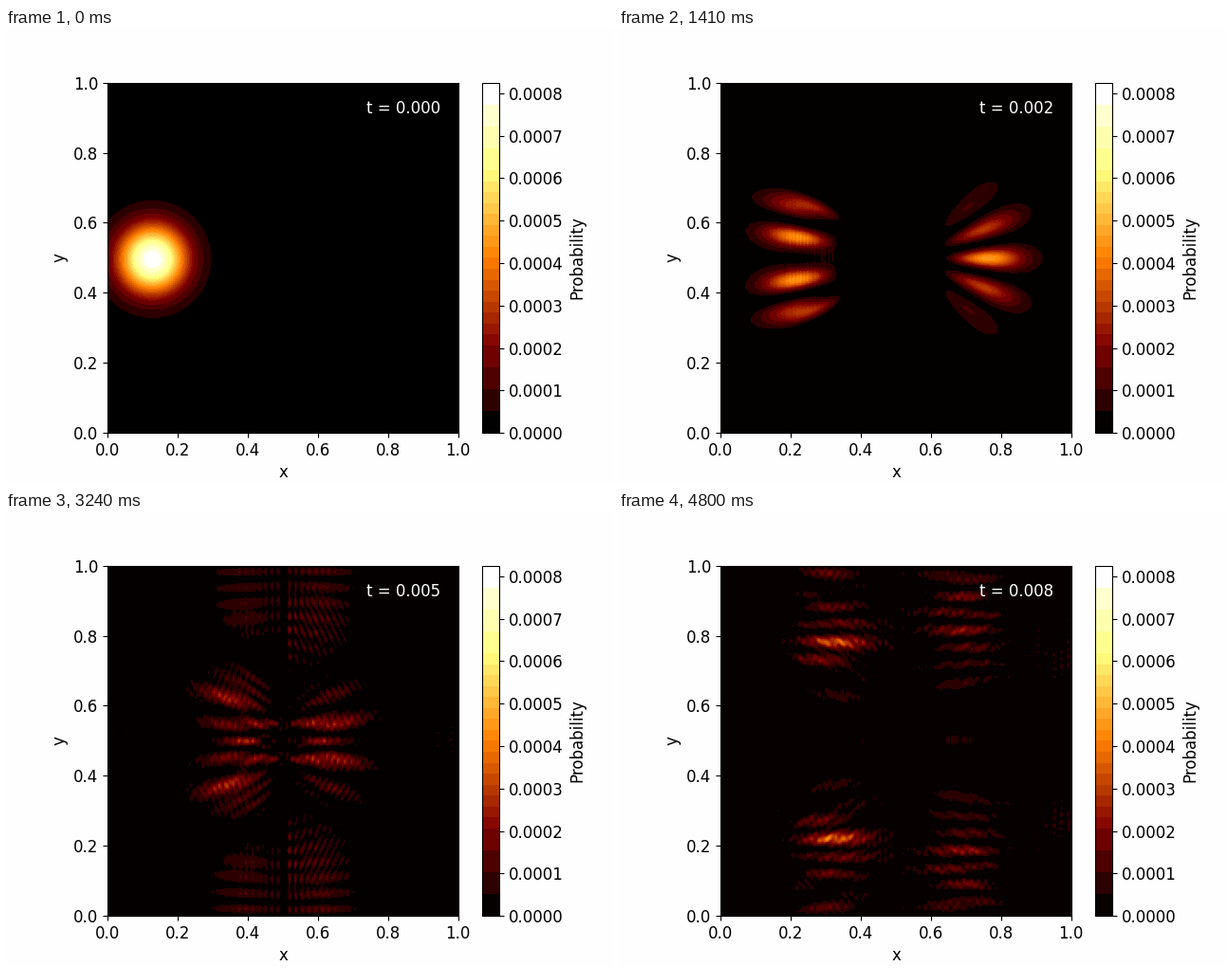
Animation of 640x480 px, one loop 4.83 s. Source, as a matplotlib script:

```python
import numpy as np
import matplotlib.pyplot as plt
from matplotlib.animation import FuncAnimation
from matplotlib.colors import ListedColormap

# Wave packet hitting a double slit: Crank-Nicolson on a closed unit box.
H = 0.005
DT = 2.5e-5
N = 199
FRAMES = 161
STEPS_PER_FRAME = 2
WALL = slice(98, 102)
SLITS = np.r_[85:95, 105:115]
A = 0.5j * DT / H**2


def sine_basis(n):
    k = np.arange(1, n + 1)
    return np.sqrt(2 / (n + 1)) * np.sin(np.pi * np.outer(k, k) / (n + 1))


def sine_energy(n):
    return 2 - 2 * np.cos(np.pi * np.arange(1, n + 1) / (n + 1))


def laplace(n):
    return 2 * np.eye(n) - np.eye(n, k=1) - np.eye(n, k=-1)


QY = sine_basis(N)
QS = QY[SLITS]


class Side:
    """Open area beside the wall, held as sine coefficients."""

    def __init__(self, cols, edge, slit_col, psi):
        n = cols.stop - cols.start
        self.cols, self.slit_col = cols, slit_col
        self.qx = sine_basis(n)
        self.edge = self.qx[edge]
        self.op = 1 + A * (sine_energy(N)[:, None] + sine_energy(n))
        self.coef = QY @ psi[:, cols] @ self.qx

    def edge_green(self):
        return (QS * (self.edge**2 / self.op).sum(axis=1)) @ QS.T

    def solve_free(self):
        self.free = self.coef / self.op
        return QS @ (self.free @ self.edge)

    def advance(self, slit):
        source = np.outer(QS.T @ slit[:, self.slit_col], self.edge)
        self.coef = 2 * (self.free + A * source / self.op) - self.coef

    def field(self):
        return QY @ self.coef @ self.qx


def start_wave():
    x = np.arange(N) * H
    packet = np.exp(-(x - 0.125)**2 / 0.02 + 200j * x)
    psi = np.outer(np.exp(-(x - 0.5)**2 / 0.02), packet)
    closed = np.ones(N, bool)
    closed[SLITS] = False
    psi[closed, WALL] = 0
    return psi / np.sqrt((abs(psi)**2).sum())


def simulate():
    psi = start_wave()
    depth = WALL.stop - WALL.start
    height = len(SLITS) // 2
    sides = [Side(slice(0, WALL.start), -1, 0, psi),
             Side(slice(WALL.stop, N), 0, depth - 1, psi)]
    slit = psi[SLITS, WALL]

    one_slit = (np.kron(laplace(height), np.eye(depth))
                + np.kron(np.eye(height), laplace(depth)))
    schur = np.eye(slit.size) + A * np.kron(np.eye(2), one_slit)
    for side in sides:
        at = np.arange(len(SLITS)) * depth + side.slit_col
        schur[np.ix_(at, at)] -= A**2 * side.edge_green()
    inverse = np.linalg.inv(schur)

    result = []
    for _ in range(FRAMES):
        prob = np.zeros((N, N))
        prob[SLITS, WALL] = abs(slit)**2
        for side in sides:
            prob[:, side.cols] = abs(side.field())**2
        result.append(prob)
        for _ in range(STEPS_PER_FRAME):
            rhs = slit.copy()
            for side in sides:
                rhs[:, side.slit_col] += A * side.solve_free()
            solved = (inverse @ rhs.ravel()).reshape(slit.shape)
            for side in sides:
                side.advance(solved)
            slit = 2 * solved - slit
    return result


probs = simulate()
vmax = probs[0].max()

# Banded colours: each coarse RGB cell shows the mean of what falls in it.
heat = (plt.get_cmap("afmhot")(np.arange(256))[:, :3] * 255).astype(int)
cells = heat // [32, 16, 32]
band = np.unique(cells @ [256, 16, 1], return_inverse=True)[1].ravel()
CELL_AREA = (369.6 / N)**2
BAR_AREA = 18.48 * 369.6 / 256
PAGE_AREA = 160000


def banded_cmap(prob):
    index = np.clip(prob / vmax * 256, 0, 255).astype(int)
    weight = np.bincount(index.ravel(), minlength=256) * CELL_AREA + BAR_AREA
    weight[255] += PAGE_AREA
    total = np.bincount(band, weight)
    means = [np.bincount(band, weight * heat[:, c]) / total for c in range(3)]
    colors = np.floor(np.stack(means, axis=1) + 1e-9)[band]
    return ListedColormap(np.minimum((colors + 0.5) / 255, 1))


PAPER = "#fefefe"
FONT = 12
plt.rcParams["font.family"] = "DejaVu Sans"
fig, ax = plt.subplots(figsize=(6.4, 4.8), dpi=100, facecolor=PAPER)
img = ax.imshow(probs[0], extent=[0, 1, 0, 1], vmin=0, vmax=vmax,
                cmap=banded_cmap(probs[0]))
ax.set_xlabel("x", fontsize=FONT)
ax.set_ylabel("y", fontsize=FONT)
ax.tick_params(labelsize=FONT)
bar = fig.colorbar(img, ax=ax, ticks=np.arange(9) * 1e-4, format="%.4f")
bar.set_label("Probability", fontsize=FONT)
bar.ax.tick_params(labelsize=FONT)
clock = ax.text(0.95, 0.95, "", color=PAPER, ha="right", va="top",
                fontsize=FONT)


def draw(i):
    img.set_data(probs[i])
    img.set_cmap(banded_cmap(probs[i]))
    clock.set_text(f"t = {i * STEPS_PER_FRAME * DT:.3f}")
    return img, clock


anim = FuncAnimation(fig, draw, frames=FRAMES, interval=30, repeat=True,
                     repeat_delay=0, blit=False)
plt.show()
```
